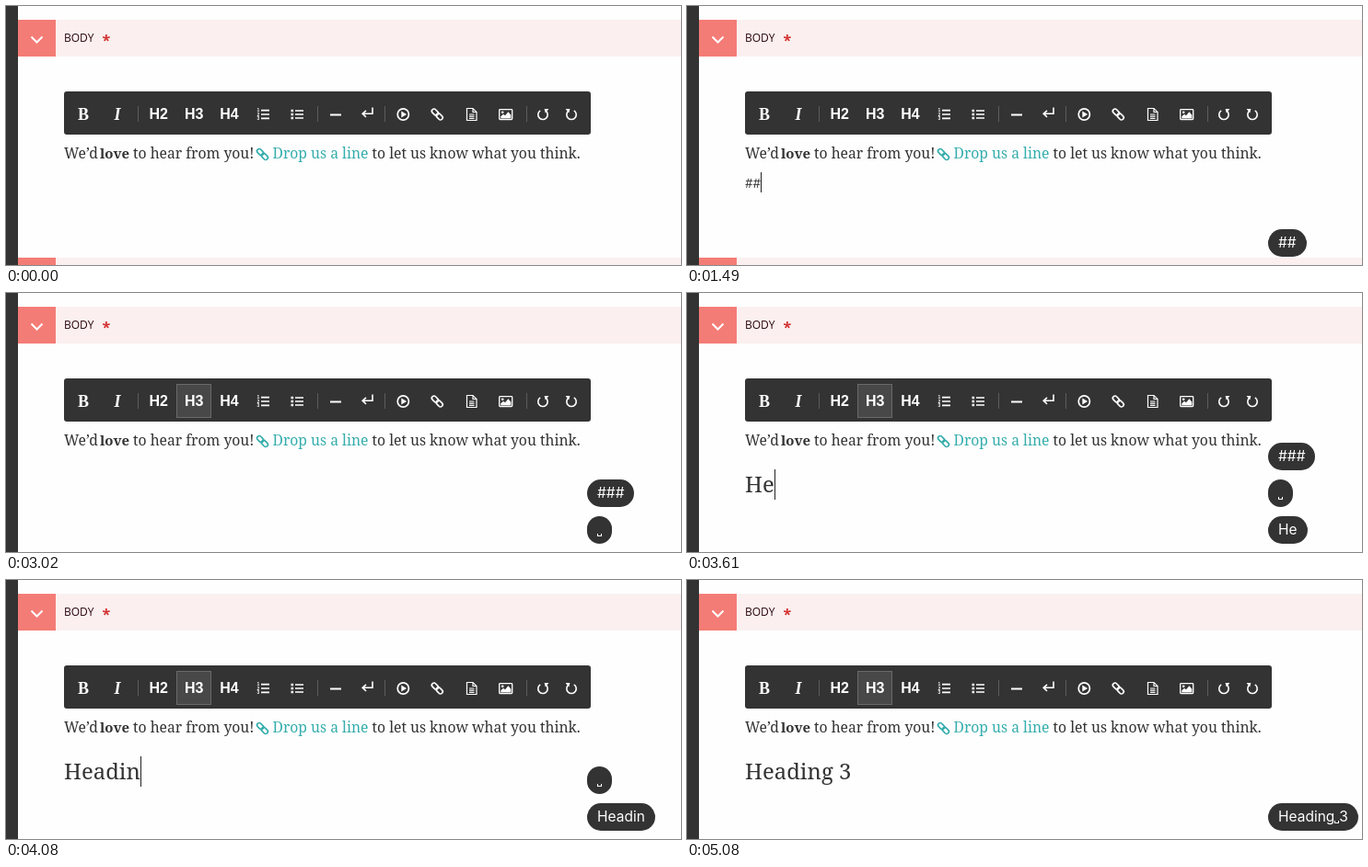
An HTML page for the animation above (5670 ms loop, 733 by 282 pixels).

```html
<!DOCTYPE html>
<html lang="en">
<head>
<meta charset="utf-8">
<title>Heading shortcut</title>
<style>
html, body { margin: 0; width: 100%; height: 100%; overflow: hidden; background: #fefefe; }
svg { position: absolute; left: 0; top: 0; }
.serif, #line { font-family: "Noto Serif", serif; font-size: 15.7px; fill: #333; color: #333; }
.label { font-family: "Open Sans", sans-serif; font-size: 12px; fill: #2b0710; }
.button { font: bold 16px "Liberation Sans", Arial, sans-serif; fill: #fff; }
.style { font: bold 18px "Liberation Serif", serif; fill: #fff; }
.tiny { font: bold 5px "Liberation Sans", sans-serif; fill: #fff; }

#line { position: absolute; left: 63px; top: 181px; height: 22px; line-height: 22px; white-space: pre; font-size: 15.3px; }
#line.heading { top: 192px; height: 33px; line-height: 32px; font-size: 23.9px; }
#line.caret::after { content: ""; position: absolute; left: 100%; top: 0; width: 1px; height: 100%; background: #222; }
#line.misspelt::before { content: ""; position: absolute; left: 0; right: 0; top: 28px; border-bottom: 2px dotted #e0666c; }

.pill { position: absolute; left: 631px; height: 30px; padding: 0 11px; border-radius: 15px; background: #333;
  color: #fff; font: 15.5px/30px Inter, sans-serif; white-space: pre; }
.pill i { display: inline-block; box-sizing: border-box; width: 5px; height: 3px; vertical-align: -2px;
  border: 1px solid #fff; border-top: 0; }
</style>
</head>
<body>
<svg width="733" height="282" viewBox="0 0 733 282">
  <defs>
    <g id="chain" fill="none" stroke-width="1.7" transform="rotate(45)">
      <rect x="-7.3" y="-2.4" width="7.8" height="4.8" rx="2.3"/>
      <rect x="-.5" y="-2.4" width="7.8" height="4.8" rx="2.3"/>
    </g>
    <g id="turn">
      <path d="M580.2 113.9A5.2 5.2 0 1 0 586.4 114.4" fill="none" stroke-width="1.6"/>
      <path d="M584.6 112h4.8l-3.6 4.6z" fill="#fff" stroke="none"/>
    </g>
  </defs>

  <rect width="13" height="282" fill="#333"/>
  <rect x="13" y="15" width="720" height="40" fill="#fbf0ef"/>
  <rect x="13" y="15" width="41" height="40" fill="#f47c76"/>
  <path d="M27.5 33.5l6 6 6-6" fill="none" stroke="#fff" stroke-width="2"/>
  <text class="label" x="63" y="39">BODY</text>
  <text class="label" x="104.5" y="42.5" style="font-size:16px;font-weight:700;fill:#d3302f">*</text>
  <g id="next">
    <rect x="13" y="274" width="720" height="8" fill="#fbf0ef"/>
    <rect x="13" y="274" width="41" height="8" fill="#f47c76"/>
  </g>

  <rect x="63" y="93" width="572" height="47" rx="3" fill="#333"/>
  <rect id="active" x="185.5" y="99.5" width="37" height="36" fill="#484848" stroke="#6a6a6a"/>
  <path d="M143.5 109v17M338.5 109v17M411.5 109v17M565.5 109v17" stroke="#5c5c5c"/>
  <text class="style" x="78" y="124">B</text>
  <text class="style" x="117.5" y="124" font-style="italic" style="font-style:italic">I</text>
  <g class="button">
    <text x="155.5" y="123">H2</text>
    <text x="194" y="123">H3</text>
    <text x="232.3" y="123">H4</text>
  </g>
  <g class="tiny">
    <text x="272.5" y="115">1</text>
    <text x="272.5" y="119.7">2</text>
    <text x="272.5" y="124.4">3</text>
  </g>
  <g fill="none" stroke="#fff" stroke-width="1.7">
    <path d="M277 113.7h9M277 118h9M277 122.3h9"/>
    <path d="M309.5 114h2.6M309.5 118h2.6M309.5 122h2.6" stroke-width="2.4"/>
    <path d="M314 114h9M314 118h9M314 122h9"/>
    <path d="M352 118.5h12" stroke-width="2"/>
    <path d="M398 110.5v6.8h-10.5M391 113.8l-3.8 3.5 3.8 3.5" stroke-width="1.6"/>
    <circle cx="431.3" cy="118" r="6.1"/>
    <path d="M429.3 114.6l5.8 3.4-5.8 3.4z" fill="#fff" stroke="none"/>
    <use href="#chain" x="0" y="0" transform="translate(468.3 118)"/>
    <path d="M500.5 111.5h6.5l4 4v9h-10.5zM507 111.5v4h4M503 118h5.5M503 120.2h5.5M503 122.4h5.5" stroke-width="1.2"/>
    <rect x="535.7" y="112.7" width="14" height="10.8" rx=".8" stroke-width="1.3"/>
    <path d="M537.3 122.2v-2l2.7-2.5 2 1.6 3.4-4 3 3.4v3.5z" fill="#fff" stroke="none"/>
    <circle cx="539.2" cy="115.8" r="1.3" fill="#fff" stroke="none"/>
    <use href="#turn"/>
    <use href="#turn" transform="translate(1197 0) scale(-1 1)"/>
  </g>

  <g class="serif">
    <text x="63" y="166">We’d</text>
    <text x="102" y="166" style="font-weight:700;font-size:15px">love</text>
    <text x="138" y="166">to hear from you!</text>
    <text x="289.5" y="166" fill="#34adac">Drop us a line</text>
    <text x="397.5" y="166">to let us know what you think.</text>
  </g>
  <use href="#chain" transform="translate(278.5 161.5)" stroke="#34adac"/>
</svg>
<div id="line"></div>
<div id="pills"></div>

<script>
const LOOP = 5670, HEADING_AT = 2490, FADE = 190;
const fadeStart = { "###": 3636, "␣": 4416 };

// time, line text, caret shown, key pills from newest to oldest
const steps = [
  [0, "", 0, []],
  [60, "", 1, []],
  [540, "", 0, []],
  [1070, "", 1, []],
  [1250, "#", 1, []],
  [1310, "#", 1, ["#"]],
  [1490, "##", 1, ["##"]],
  [1660, "###", 1, ["##"]],
  [1720, "###", 1, ["###"]],
  [2190, "###", 0, ["###"]],
  [2490, "", 1, ["###"]],
  [2540, "", 1, ["␣", "###"]],
  [3020, "", 0, ["␣", "###"]],
  [3490, "H", 1, ["␣", "###"]],
  [3550, "H", 1, ["H", "␣", "###"]],
  [3610, "He", 1, ["He", "␣", "###"]],
  [3670, "He", 1, ["He", "␣", "###"]],
  [3730, "Hea", 1, ["Hea", "␣", "###"]],
  [3790, "Hea", 1, ["Hea", "␣", "###"]],
  [3840, "Head", 1, ["Head", "␣"]],
  [3960, "Headi", 1, ["Headi", "␣"]],
  [4080, "Headin", 1, ["Headin", "␣"]],
  [4130, "Heading", 1, ["Heading", "␣"]],
  [4310, "Heading ", 1, ["Heading␣", "␣"]],
  [4480, "Heading ", 1, ["Heading␣", "␣"]],
  [4540, "Heading 3", 1, ["Heading␣3", "␣"]],
  [4600, "Heading 3", 1, ["Heading␣3"]],
  [5080, "Heading 3", 0, ["Heading␣3"]],
];

const $ = id => document.getElementById(id);
const line = $("line"), pills = $("pills"), active = $("active"), next = $("next");

function pill(keys, row, time) {
  const faded = (time - (fadeStart[keys] ?? LOOP)) / FADE;
  const opacity = Math.max(0, Math.min(1, 1 - faded));
  const label = keys.replace("␣", "<i></i>");
  return `<div class="pill" style="top:${243 - 40 * row}px;opacity:${opacity}">${label}</div>`;
}

function show([time, text, caret, keys]) {
  const heading = time >= HEADING_AT;
  line.textContent = text;
  line.classList.toggle("heading", heading);
  line.classList.toggle("caret", !!caret);
  line.classList.toggle("misspelt", /^Head?i?$|^Hea$/.test(text) && text.length > 2);
  active.style.display = heading ? "" : "none";
  next.style.display = heading ? "none" : "";
  pills.innerHTML = keys.map((k, row) => pill(k, row, time)).join("");
}

let shown;
const start = performance.now();
function tick() {
  const t = (performance.now() - start) % LOOP;
  const step = steps.findLast(s => s[0] <= t);
  if (step !== shown) show(shown = step);
  requestAnimationFrame(tick);
}
tick();
</script>
</body>
</html>
```
